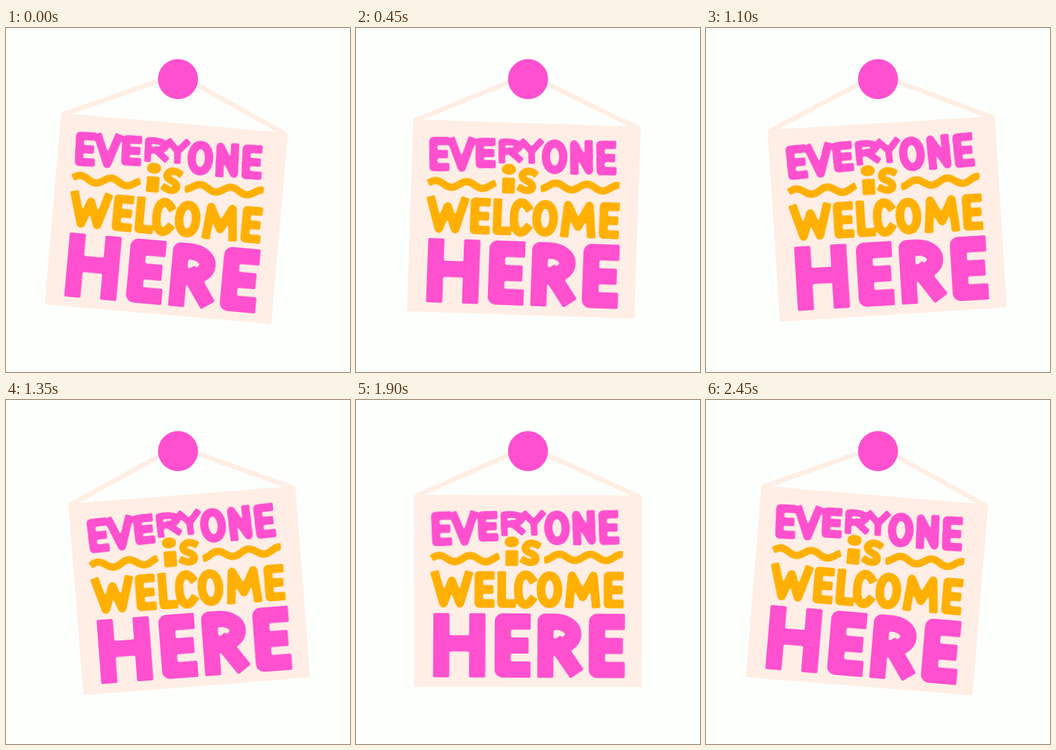
An HTML page for the animation above (2.5 s loop, 498 by 498 pixels).

```html
<!DOCTYPE html>
<html lang="en">
<head>
<meta charset="utf-8">
<title>Everyone is welcome here</title>
<style>
  html, body { margin: 0; width: 100%; height: 100%; overflow: hidden; background: #fdfffc; }
  svg { display: block; width: 100vw; height: 100vh; }
  .ink path { fill: none; stroke-linejoin: round; }
</style>
</head>
<body>
<svg viewBox="0 0 498 498" role="img" aria-label="Everyone is welcome here">
  <!-- blur and threshold: softens the corners of the lettering -->
  <filter id="soft" color-interpolation-filters="sRGB">
    <feGaussianBlur stdDeviation="1.3"/>
    <feComponentTransfer><feFuncA type="linear" slope="4" intercept="-1.5"/></feComponentTransfer>
  </filter>
  <g id="sign">
    <path d="M88 139.500L249 67L411 139.500" fill="none" stroke="#feeee5" stroke-width="7"/>
    <path d="M85 138L414.500 137.500L415 415L86 416Z" fill="#feeee5"/>
    <g class="ink" id="pink" stroke="#fe50cf" filter="url(#soft)"></g>
    <g class="ink" id="gold" stroke="#ffb003" filter="url(#soft)">
      <g fill="#ffb003" stroke="none">
        <ellipse cx="226" cy="205.500" rx="10.500" ry="8"/>
        <rect x="217" y="217.500" width="18.500" height="23"/>
      </g>
    </g>
  </g>
  <circle cx="249" cy="74" r="29" fill="#fe50cf"/>
</svg>
<script>
const $ = id => document.getElementById(id);

// Pen strokes in a unit box, with width, advance and left bearing
const glyphs = {
  E: { w: 29, adv: 33, d: "M1,0L0,0L0,1L1,1M0,.5L.9,.5" },
  V: { w: 40, adv: 34, left: -6, d: "M0,0L.5,1L1,0" },
  R: { w: 36, adv: 40, d: "M0,1L0,0L.3,0C1.2,0 1.2,.52 .3,.52L0,.52M.45,.52L.95,.95" },
  Y: { w: 34, adv: 23, left: -9, d: "M0,0L.5,.5L1,0M.5,.5L.5,1" },
  O: { w: 37, adv: 41, d: "M.5,0C1.17,0 1.17,1 .5,1C-.17,1 -.17,0 .5,0Z" },
  N: { w: 33, adv: 38, d: "M0,1L0,0L1,1L1,0" },
  W: { w: 60, adv: 63, d: "M0,0L.25,1L.5,.2L.75,1L1,0" },
  L: { w: 27, adv: 24, d: "M0,0L0,1L1,1" },
  C: { w: 33, adv: 33, d: "M.95,.12C.5,-.2 0,0 0,.5C0,1 .5,1.2 .95,.88" },
  M: { w: 51, adv: 56, d: "M0,1L.1,0L.5,.75L.9,0L1,1" },
  H: { w: 42, adv: 48, d: "M0,0L0,1M1,0L1,1M0,.46L1,.46" },
  S: { w: 30, adv: 33, d: "M.95,.08C.3,-.2 -.35,.3 .4,.48C1.25,.68 .85,1.2 0,.88" }
};

function stroke(parent, d, width, cap) {
  const path = document.createElementNS("http://www.w3.org/2000/svg", "path");
  path.setAttribute("d", d);
  path.setAttribute("stroke-width", width);
  path.setAttribute("stroke-linecap", cap);
  $(parent).append(path);
  return path;
}

function word(parent, text, x, y, { height, weight, scale = 1, track = 0, tilt = 0, rise = 0 }) {
  [...text].forEach((char, i) => {
    const { w, adv, left = 0, d } = glyphs[char];
    const h = height(i), pen = Math.min(weight, h * 0.27);
    const bx = x + left * scale, by = y - i * rise, bw = w * scale;
    const place = (_, u, v) =>
      `${bx + pen / 2 + u * (bw - pen)} ${by + pen / 2 + v * (h - pen)}`;
    stroke(parent, d.replace(/(-?[\d.]+),(-?[\d.]+)/g, place), pen, "square")
      .setAttribute("transform", `rotate(${tilt} ${bx + bw / 2} ${by + h / 2})`);
    x += adv * scale + track;
  });
}

function wave(parent, from, to, crest, y) {
  let d = "";
  for (let x = from; x <= to; x += 2)
    d += `${d ? "L" : "M"}${x} ${y - 4.5 * Math.cos((x - crest) / 45 * 2 * Math.PI)}`;
  stroke(parent, d, 10.5, "butt");
}

// The middle of the first word is cut short to make room for "is"
const arch = i => i === 3 || i === 4 ? 36 : i === 2 ? 44 : 50;

word("pink", "EVERYONE", 110, 162, { height: arch, weight: 12, tilt: -2.5, rise: 0.4 });
word("pink", "HERE", 113, 309, { height: () => 93, weight: 23.5, scale: 1.8, track: 2.5 });
word("gold", "WELCOME", 109.5, 248, { height: () => 53, weight: 12.5 });
word("gold", "S", 239, 202, { height: () => 39, weight: 12 });
wave("gold", 110, 209, 121, 230);
wave("gold", 273, 388, 295, 227.5);

const LOOP = 2500, STEP = 50;

// A triangle swing with slightly rounded turning points
function angleAt(t) {
  const round = 0.99, phase = (t - 30) / LOOP * 2 * Math.PI;
  return 0.3 + 4.9 * Math.asin(round * Math.cos(phase)) / Math.asin(round);
}

function draw() {
  const t = Math.floor(performance.now() % LOOP / STEP) * STEP;
  $("sign").setAttribute("transform", `rotate(${angleAt(t)} 249 74)`);
  requestAnimationFrame(draw);
}
draw();
</script>
</body>
</html>
```
